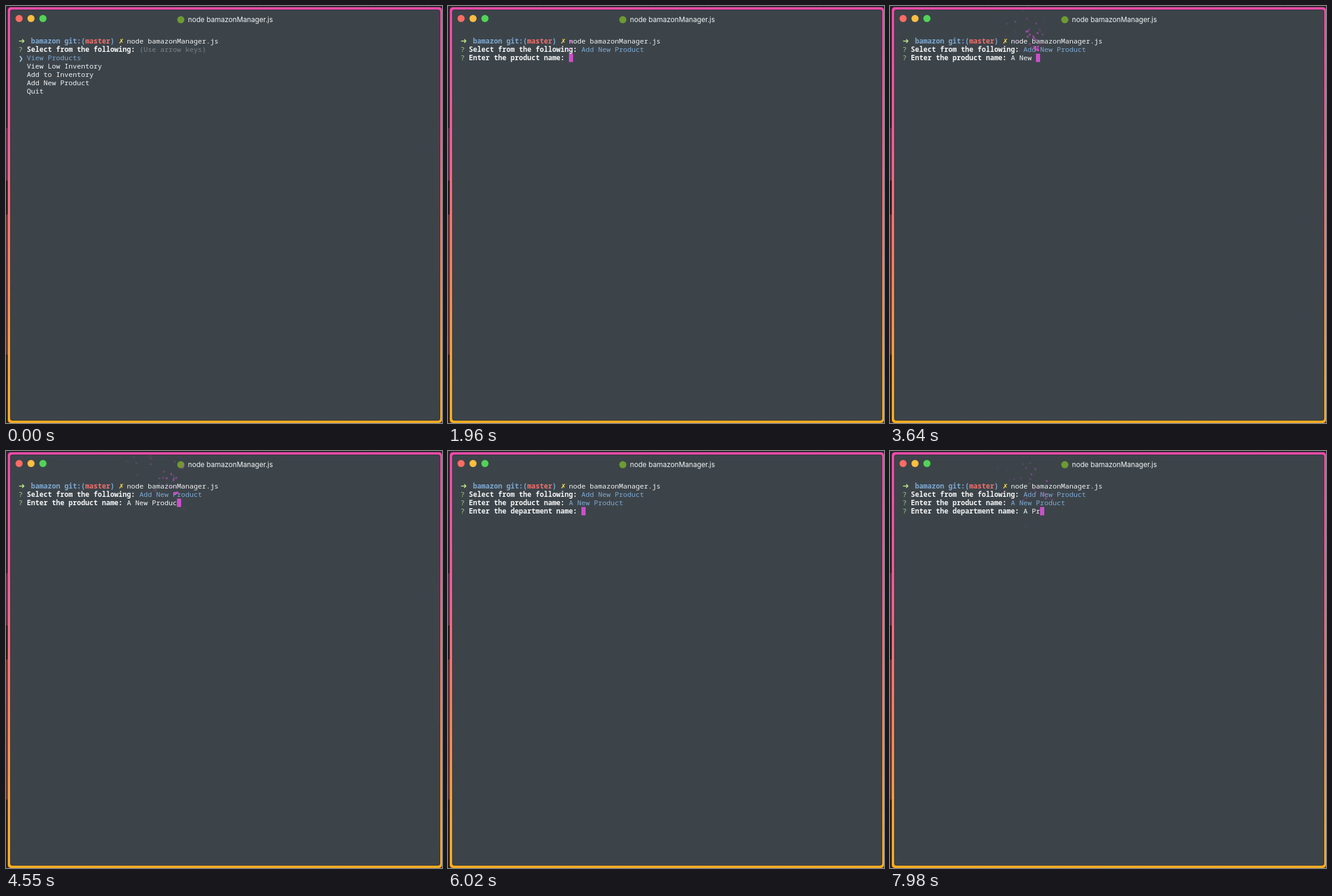
An HTML page with a canvas for the animation above (8000 ms loop, 732 by 700 pixels).

```html
<!DOCTYPE html>
<html lang="en">
<head>
<meta charset="utf-8">
<title>Terminal</title>
<style>
  html, body { margin: 0; width: 100%; height: 100%; overflow: hidden; background: #241f24; }
  canvas { display: block; }
</style>
</head>
<body>
<canvas id="stage" width="732" height="700"></canvas>
<script>
const ctx = document.getElementById('stage').getContext('2d');
const LOOP = 8000, STEP = 70;
const CELL = 7, ROW = 14, LEFT = 21, TOP = 52;
const MONO = '"Noto Sans Mono", "DejaVu Sans Mono", monospace';
const SYMBOL = '"DejaVu Sans", sans-serif';
const C = {
  bg: '#3c444a', white: '#f4f5f5', dim: '#7c8286', blue: '#7fa9d1',
  green: '#a9cf78', red: '#f2706b', yellow: '#ffe14f', cursor: '#cb4fc8'
};

const OPTIONS = ['View Products', 'View Low Inventory', 'Add to Inventory', 'Add New Product', 'Quit'];
const DOWN = [70, 350, 1050];
const CHOSEN = 1610, NAMED = 5040;
const PRODUCT = {
  text: 'A New Product', col: 26, row: 2,
  times: [2590, 2730, 3010, 3220, 3430, 3570, 3710, 3850, 3990, 4130, 4300, 4470, 4620]
};
const DEPARTMENT = { text: 'A Pr', col: 29, row: 3, times: [7040, 7270, 7480, 7720] };

const colX = col => LEFT + col * CELL;
const rowY = row => TOP + row * ROW;
const countPast = (times, t) => times.filter(time => time <= t).length;

function random(seed) {
  return () => {
    seed = (seed * 1664525 + 1013904223) >>> 0;
    return seed / 4294967296;
  };
}

// Sparks thrown up from the cursor on every key press.
const sparks = [];
const rnd = random(41);
function burst(start, x, y, count, spread = 1) {
  for (let i = 0; i < count; i++) {
    sparks.push({ start, x, y, vx: (rnd() * 2 - 1) * spread, vy: -3.5 + rnd() * 2 });
  }
}
burst(1820, 204, 82, 3, 0.35);
for (const input of [PRODUCT, DEPARTMENT]) {
  input.times.forEach((time, i) => {
    burst(time, colX(input.col + i + 1), rowY(input.row), 5 + Math.floor(rnd() * 5));
  });
}

function roundRect(x, y, w, h, r, fill) {
  ctx.fillStyle = fill;
  ctx.beginPath();
  ctx.roundRect(x, y, w, h, r);
  ctx.fill();
}

function dot(x, y, r, fill) {
  ctx.fillStyle = fill;
  ctx.beginPath();
  ctx.arc(x, y, r, 0, Math.PI * 2);
  ctx.fill();
}

function write(text, col, row, color, bold = false) {
  ctx.font = `${bold ? 'bold ' : ''}11.667px ${MONO}`;
  ctx.fillStyle = color;
  ctx.fillText(text, colX(col), rowY(row) + 11);
}

function symbol(char, col, row, color, size) {
  ctx.font = `bold ${size}px ${SYMBOL}`;
  ctx.fillStyle = color;
  ctx.fillText(char, colX(col), rowY(row) + 11);
}

function question(text, row) {
  write('?', 0, row, C.green);
  write(text, 2, row, C.white, true);
}

function drawWindow() {
  const strip = [[0, '#29242a'], [205, '#54304a'], [293, '#241d23'], [350, '#5b3436'], [585, '#2b211d']];
  ctx.fillStyle = '#29242a';
  ctx.fillRect(0, 0, 732, 700);
  strip.forEach(([y, color]) => {
    ctx.fillStyle = color;
    ctx.fillRect(0, y, 4, 700 - y);
  });
  const edge = ctx.createLinearGradient(0, 2, 0, 700);
  edge.addColorStop(0, '#ec4aa8');
  edge.addColorStop(0.3, '#ee5c91');
  edge.addColorStop(0.6, '#f37d62');
  edge.addColorStop(0.85, '#f5a036');
  edge.addColorStop(1, '#f6ac22');
  roundRect(3, 2, 729, 698, 5, edge);
  roundRect(7, 6, 722, 690, 4, '#30363b');
  roundRect(8, 7, 720, 688, 4, C.bg);

  dot(22, 21, 6, '#fc6b64');
  dot(42, 21, 6, '#fdbd41');
  dot(62, 21, 7, '#2c5438');
  dot(62, 21, 6, '#55d15b');
  dot(293.5, 23, 6, '#6d9a32');
  ctx.font = '11.7px Inter, sans-serif';
  ctx.fillStyle = C.white;
  ctx.fillText('node bamazonManager.js', 305.5, 27);
}

function drawCommand() {
  symbol('➜', 0, 0, '#b9e184', 13);
  write('bamazon', 3, 0, C.blue, true);
  write('git:(', 11, 0, C.blue, true);
  write('master', 16, 0, C.red, true);
  write(')', 22, 0, C.blue, true);
  symbol('✗', 24, 0, C.yellow, 11);
  write('node bamazonManager.js', 26, 0, C.white);
}

function drawMenu(t) {
  const selected = countPast(DOWN, t);
  if (!selected) write('(Use arrow keys)', 29, 1, C.dim);
  OPTIONS.forEach((option, i) => {
    const active = i === selected;
    if (active) symbol('❯', 0, i + 2, '#a9cde8', 9.5);
    write(option, 2, i + 2, active ? C.blue : C.white);
  });
}

function drawInput(input, t) {
  const count = countPast(input.times, t);
  write(input.text.slice(0, count), input.col, input.row, C.white);
  ctx.fillStyle = C.cursor;
  ctx.fillRect(colX(input.col + count), rowY(input.row), CELL, ROW);
}

function drawSparks(t) {
  ctx.fillStyle = C.cursor;
  for (const s of sparks) {
    const n = (t - s.start) * 0.06;
    const alpha = 0.96 ** n;
    if (n < 0 || alpha < 0.1) continue;
    ctx.globalAlpha = alpha;
    ctx.fillRect(s.x + s.vx * n - 1, s.y + s.vy * n + 0.0375 * n * n - 1, 3, 3);
  }
  ctx.globalAlpha = 1;
}

function draw(t) {
  drawWindow();
  drawCommand();
  question('Select from the following:', 1);
  if (t < CHOSEN) {
    drawMenu(t);
  } else {
    write('Add New Product', 29, 1, C.blue);
    question('Enter the product name:', 2);
    if (t < NAMED) {
      drawInput(PRODUCT, t);
    } else {
      write(PRODUCT.text, PRODUCT.col, PRODUCT.row, C.blue);
      question('Enter the department name:', 3);
      drawInput(DEPARTMENT, t);
    }
  }
  drawSparks(t);
}

const began = performance.now();
function tick() {
  const t = (performance.now() - began) % LOOP;
  draw(Math.floor(t / STEP) * STEP);
  requestAnimationFrame(tick);
}
tick();
</script>
</body>
</html>
```
